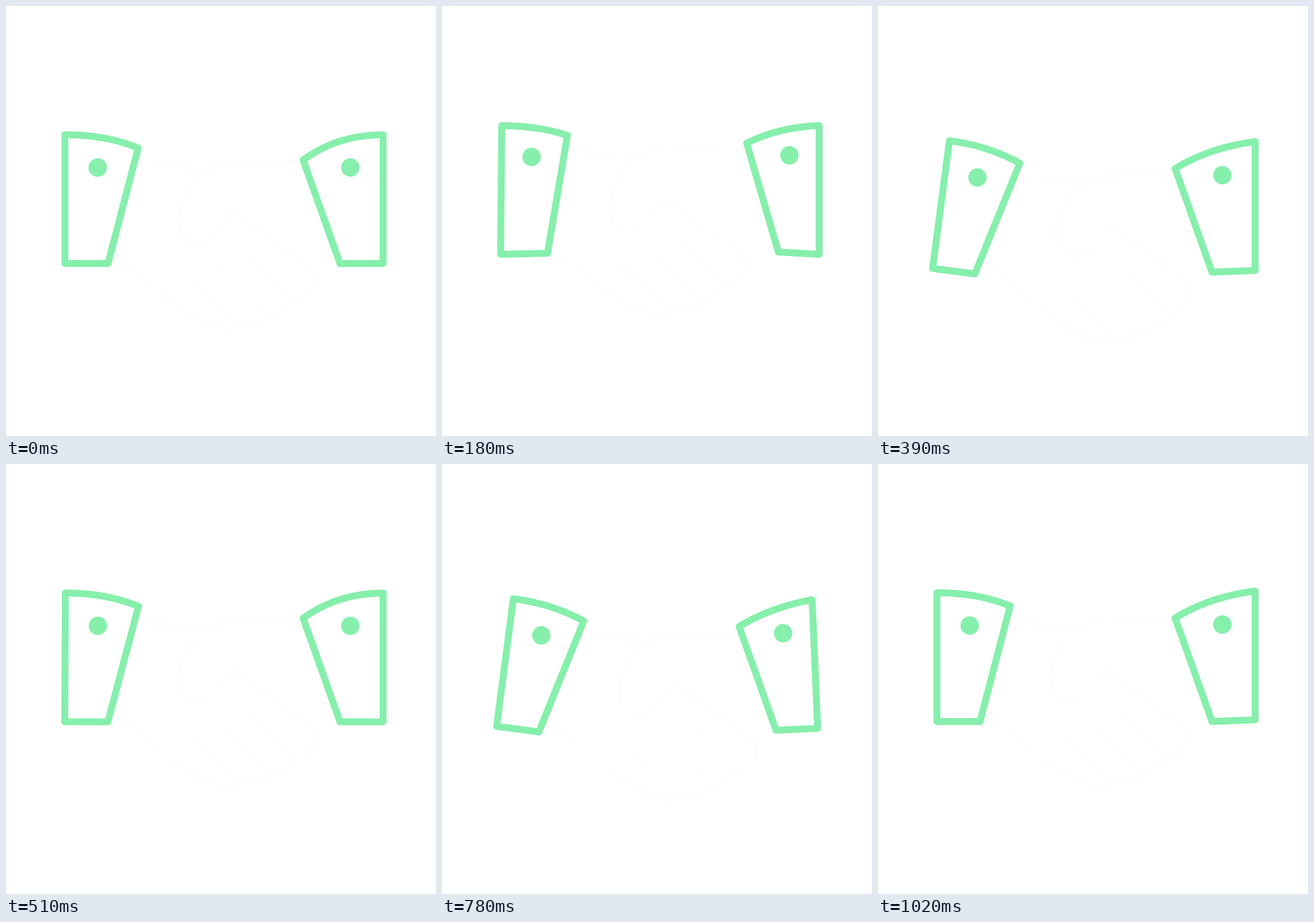
An HTML page for the animation above (3.05 s loop, 748 px wide and 748 px high).

```html
<!DOCTYPE html>
<html lang="en">
<head>
<meta charset="utf-8">
<title>Handshake</title>
<style>
  html, body { margin: 0; height: 100%; overflow: hidden; background: #fff; }
  svg { display: block; width: 100%; height: 100%; }
  .cuff { fill: none; stroke: #86efac; stroke-width: 12; stroke-linejoin: round; }
  .button { fill: #86efac; }
  .hands { fill: none; stroke: #fefefe; stroke-width: 8; stroke-linecap: round; stroke-linejoin: round; }
</style>
</head>
<body>
<svg viewBox="0 0 748 748">
  <g class="hands">
    <path d="M255 299L352 308M512 296Q410 290 370 303C300 340 290 440 345 435Q375 430 403 380L540 480Q560 520 510 538"/>
    <path d="M200 458C260 500 300 560 390 585Q480 570 510 538"/>
    <path d="M428 452l80 84M385 477l77 78M332 500l78 74"/>
  </g>
  <path class="cuff"/><circle class="button" r="16"/>
  <path class="cuff"/><circle class="button" r="16"/>
</svg>
<script>
const LOOP = 3050, STEP = 30, LAST_MOVE = 1020;
const FLOOR = 448, WALL = 102.5, MIRROR = 758.5;
const HEM = 75, HEIGHT = 224;              // lower edge and outer edge of a cuff
const BUTTON = { x: 57, y: 167 };          // measured from the outer lower corner

// Both cuffs share one shape; only the inner edge differs. The right one is mirrored.
const sides = {
  left:  { dir: 1, lean: 14.6, length: 207.7 },
  right: { dir: -1, lean: 19.6, length: 191.2 }
};

// drop: lower the cuff; turn, outer: tilt the inner and outer edge (degrees);
// hem: lower the outer corner; reach: lengthen the inner edge; sag: flatten the top.
const rest = { drop: 0, turn: 0, hem: 0, outer: 0, reach: 0, sag: 0 };
const pose = changes => ({ ...rest, ...changes });
const leftUp = pose({ drop: -18, turn: -5, hem: 2, outer: 0.5 });
const leftDown = pose({ drop: 18, turn: 7.5, hem: -9.5, outer: 7.5 });
const rightUp = pose({ drop: -20, turn: -3.4, hem: 4, reach: 6, sag: 3 });
const rightDown = pose({ drop: 15, hem: -3, sag: 10 });
const rightTilted = { ...rightDown, outer: 2.5 };
const rightEnd = { ...rightDown, drop: 0 };

const keys = [
  { at: 0, left: rest, right: rest },
  { at: 185, left: leftUp, right: rightUp },
  { at: 390, left: leftDown, right: rightDown },
  { at: 540, left: rest, right: rest },
  { at: 560, left: rest, right: rest },
  { at: 810, left: leftDown, right: rightTilted },
  { at: LAST_MOVE, left: rest, right: rightEnd }
];

const hands = document.querySelector('.hands');
const cuffs = document.querySelectorAll('.cuff');
const buttons = document.querySelectorAll('.button');

const radians = degrees => degrees * Math.PI / 180;
const ease = u => u < 0.5 ? 4 * u ** 3 : 1 - 4 * (1 - u) ** 3;
const mix = (a, b, k) => a + (b - a) * k;
const mixPoint = (a, b, k) => a.map((v, i) => mix(v, b[i], k));
const mixPose = (a, b, k) =>
  Object.fromEntries(Object.keys(a).map(name => [name, mix(a[name], b[name], k)]));
const climb = ([x, y], tilt, length) =>
  [x + length * Math.sin(radians(tilt)), y - length * Math.cos(radians(tilt))];

function drawCuff(index, { dir, lean, length }, p) {
  const innerFoot = [WALL + HEM - 1.2 * p.turn * dir, FLOOR + p.drop];
  const outerFoot = [WALL - p.outer * dir, FLOOR + p.drop + p.hem];
  const innerTop = climb(innerFoot, lean + p.turn, length + p.reach);
  const outerTop = climb(outerFoot, p.outer, HEIGHT);

  // The top leaves the outer edge at a right angle.
  const bend = climb(outerTop, p.outer + 90, 0.57 * (innerTop[0] - outerTop[0]));
  bend[1] += p.sag;

  // The button keeps its relative place between the two edges.
  const slope = radians(lean);
  const button = mixPoint(
    mixPoint(outerFoot, outerTop, BUTTON.y / HEIGHT),
    mixPoint(innerFoot, innerTop, BUTTON.y / (length * Math.cos(slope))),
    BUTTON.x / (HEM + BUTTON.y * Math.tan(slope)));

  const place = ([x, y]) => [dir > 0 ? x : MIRROR - x, y];
  const [a, b, c, d, e] = [outerTop, bend, innerTop, innerFoot, outerFoot].map(place);
  const [cx, cy] = place(button);
  cuffs[index].setAttribute('d', `M${a}Q${b} ${c}L${d}L${e}Z`);
  buttons[index].setAttribute('cx', cx);
  buttons[index].setAttribute('cy', cy);
}

function draw(time) {
  const t = Math.min(Math.floor(time % LOOP / STEP) * STEP, LAST_MOVE);
  const next = Math.max(1, keys.findIndex(key => key.at >= t));
  const from = keys[next - 1], to = keys[next];
  const k = ease((t - from.at) / (to.at - from.at));
  const left = mixPose(from.left, to.left, k);
  drawCuff(0, sides.left, left);
  drawCuff(1, sides.right, mixPose(from.right, to.right, k));

  const lift = left.drop - leftDown.drop;
  hands.setAttribute('transform', `translate(${0.5 * lift} ${1.3 * lift})`);
}

const start = performance.now();
function tick() {
  draw(performance.now() - start);
  requestAnimationFrame(tick);
}
tick();
</script>
</body>
</html>
```
